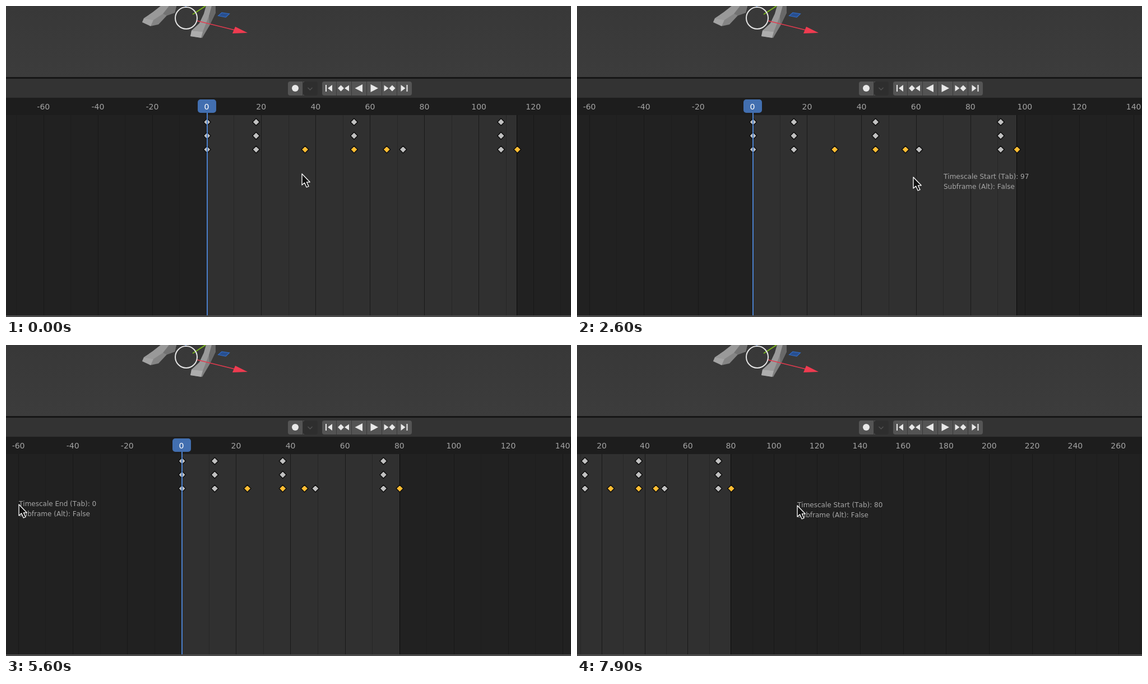
Recreate the animation shown at these times as an HTML page. Size 1008x556 px, loop 8000 ms.

```html
<!DOCTYPE html>
<html lang="en">
<head>
<meta charset="utf-8">
<title>Timeline</title>
<style>
html, body { margin: 0; width: 100%; height: 100%; overflow: hidden; background: #212121; }
svg { display: block; width: 1008px; height: 556px; }
text { font: 14px "DejaVu Sans", sans-serif; font-kerning: none; white-space: pre; }
.crisp rect { shape-rendering: crispEdges; }
.label { fill: #a3a3a3; text-anchor: middle; }
.hint text { font-size: 12px; fill: #a6a6a6; }
.pie text { fill: #dedede; }
.pie .num { fill: #737373; text-anchor: end; }
.pie .title { fill: #929292; text-anchor: middle; }
.line { fill: none; stroke: #d6d6d6; stroke-width: 1.5; }
.solid { fill: #dcdcdc; }
</style>
</head>
<body>
<svg viewBox="0 0 1008 556">
  <defs>
    <linearGradient id="room" x1="0" y1="0" x2="0" y2="1">
      <stop offset="0" stop-color="#383838"/><stop offset="1" stop-color="#3c3c3c"/>
    </linearGradient>
    <path id="key" d="M0-6.4L6.4 0L0 6.4L-6.4 0Z" stroke="#0c0c0c" stroke-width="1.4"/>
    <path id="arrow" d="M0 0V20L4.6 16L8.200 24L12 22.400L8.400 14.800H14.200Z" fill="#111" stroke="#fff" stroke-width="1.300" stroke-linejoin="round"/>
    <path id="hand" d="M0-7L3-3.5H-3ZM0 7L3 3.5H-3ZM-7 0L-3.5-3V3ZM7 0L3.5-3V3Z" fill="#111" stroke="#eee" stroke-width="1.2"/>
    <path id="bracket" class="line" d="M-9 4V-1.5H9V4"/>
    <path id="diamond" class="solid" d="M0-8L8 0L0 8L-8 0Z"/>
    <path id="squiggle" class="line" d="M-9 9C-5 8-8 4-7 1S-3 3-3-1S-1-6 1-4S3-3 4-6S7-5 9-7"/>
    <g id="clock"><circle class="solid" r="9.5"/><path d="M3-6L-2 0L3 5" fill="none" stroke="#181818" stroke-width="2.4"/></g>
    <path id="watch" class="line" d="M-7 2a7 7 0 1 0 14 0a7 7 0 1 0-14 0M0-5V-9M-3-9H3M0 2V-2M0 2H3M6-5L8-7"/>
    <g id="trim"><path class="line" d="M-5-8H9V-4H-5ZM-9-1H-1V2H-9ZM1-10V10"/><path class="solid" d="M-6 4H-1V9H-6ZM3 4H9V9H3Z"/></g>
    <g id="steps">
      <path d="M570 141H572V153H570ZM582 141V153L574 147Z"/>
      <path d="M592 147L597.5 141.5L603 147L597.5 152.5ZM612 141.5V152.5L604 147Z"/>
      <path d="M636 140V154L622.5 147Z"/>
    </g>
  </defs>

  <g id="sheet"></g>

  <rect width="1008" height="128" fill="url(#room)"/>
  <path d="M276 0L262 11L246 22L243 29L258 36L272 33L287 17L301 12L304 0Z" fill="#858585"/>
  <path d="M276 0L262 11L246 22L263 25L280 14L291 0Z" fill="#999"/>
  <path d="M243 29L246 22L263 25L258 36Z" fill="#a3a3a3"/>
  <path d="M291 0H304L301 12L287 17L280 14Z" fill="#737373"/>
  <path d="M357 0H374V12L363 35L350 57L329 54L331 44L345 31L353 14Z" fill="#808080"/>
  <path d="M357 0H367L362 18L351 46L331 44L345 31L353 14Z" fill="#9a9a9a"/>
  <path d="M331 44L351 46L348 57L329 54Z" fill="#adadad"/>
  <path d="M367 0H374V12L363 35L362 18Z" fill="#696969"/>
  <path d="M333 15L356 0" stroke="#79b51c" stroke-width="2"/>
  <path d="M320 2L321 0" stroke="#3b70c8" stroke-width="2"/>
  <path d="M341 26.5L408 43" stroke="#e23a4e" stroke-width="1.6"/>
  <path d="M404 49L409 37L431 48Z" fill="#ef3b50"/>
  <path d="M378.5 17.5L385 12L398.5 14L392 20Z" fill="#284f8f" stroke="#316bc4" stroke-width="1.2"/>
  <circle cx="321.5" cy="21.5" r="19.5" fill="none" stroke="#e6e6e6" stroke-width="2"/>

  <rect y="127" width="1008" height="3" fill="#161616"/>
  <rect y="130" width="1008" height="34" fill="#333"/>
  <rect x="503" y="135" width="40" height="25" rx="4" fill="#545454"/>
  <rect x="530" y="135" width="26" height="25" rx="4" fill="#2e2e2e"/>
  <path d="M529.5 135V160" stroke="#333"/>
  <path d="M538.5 146L542.5 150L546.5 146" fill="none" stroke="#555" stroke-width="1.3"/>
  <rect x="564" y="135" width="160" height="25" rx="4" fill="#545454"/>
  <path d="M589.5 135v25m27-25v25m27-25v25m27-25v25m27-25v25" stroke="#3a3a3a"/>
  <g fill="#e8e8e8">
    <circle cx="516" cy="147" r="6"/>
    <use href="#steps"/>
    <use href="#steps" transform="matrix(-1 0 0 1 1286.5 0)"/>
  </g>
  <rect y="553" width="1008" height="3" fill="#4b4b4b"/>

  <g id="ruler"></g>
  <g id="over"></g>
</svg>
<script>
const LOOP = 8000, STEP = 100, WIDTH = 1008;
const TOP = 195, BOTTOM = 553, ROW = 24.6;
const KEYS = [0, 18, 36, 54, 66, 72, 108, 114];
const ORANGE = [36, 54, 66, 114];
const UPPER = [0, 18, 54, 108];

// Key points: time, then values, linear in between.
const mouse = [
  [0, 528, 300], [500, 558, 309], [1300, 558, 309], [1400, 535.5, 302], [1600, 340, 308],
  [2200, 720, 306], [2500, 654, 306], [2600, 600, 306], [2900, 600, 311], [3500, 452, 275],
  [3800, 452, 275], [4100, 390, 276], [4600, 690, 284], [5500, 23, 285], [5800, 23, 285],
  [6100, 597, 312], [6600, 597, 312], [7100, 487, 311], [7400, 225, 306], [7600, 430, 290],
  [7800, 393, 287]
];
const lastFrame = [
  [1700, 114], [2200, 148], [2500, 144], [2600, 97], [2800, 58], [4200, 58], [4600, 100], [5200, 80]
];
// Time, position of frame zero, pixels per frame, vertical scroll.
const view = [
  [200, 358.4, 4.855, 0], [500, 313.7, 4.855, 0], [6200, 313.7, 4.855, 0],
  [6500, 354, 3.84, 0], [7100, 229.6, 3.84, -8.7], [7400, -32.4, 3.84, 0]
];
// Opening, closing, centre.
const pies = [[700, 1700, 558, 309], [3700, 4200, 452, 275], [7600, 7800, 430, 290]];
const pans = [[200, 500], [6600, 7500]];
const modals = [[1700, 3000], [4200, 5900], [7900, 8000]];

// The number is the numpad key, which also gives the direction.
const items = [
  { name: "Auto Frame Range", num: 8, icon: "bracket" },
  { name: "Bake Keyframe (Experimental)", num: 7, icon: "diamond", hot: "B" },
  { name: "Randomize Keyframes", num: 9, icon: "squiggle", hot: "R" },
  { name: "Timescale Keyframe (Slow)", num: 4, icon: "clock", hot: "T" },
  { name: "Set Frame Range", num: 6, icon: "watch", hot: "S" },
  { name: "Trim Keyframe", num: 2, icon: "trim", hot: "K" }
];

const pen = document.createElement("canvas").getContext("2d");
pen.font = '14px "DejaVu Sans", sans-serif';
pen.fontKerning = "none";
const widthOf = s => pen.measureText(s).width;

function at(track, t) {
  if (t <= track[0][0]) return track[0].slice(1);
  const i = track.findIndex(p => p[0] > t);
  if (i < 0) return track[track.length - 1].slice(1);
  const a = track[i - 1], b = track[i], k = (t - a[0]) / (b[0] - a[0]);
  return a.slice(1).map((v, n) => v + (b[n + 1] - v) * k);
}
const within = (spans, t) => spans.find(s => t >= s[0] && t < s[1]);
const rect = (x, y, w, h, fill, more = "") =>
  `<rect x="${x}" y="${y}" width="${Math.max(0, w)}" height="${h}" fill="${fill}" ${more}/>`;
const text = (x, y, s, cls = "") => `<text x="${x}" y="${y}" class="${cls}">${s}</text>`;
const use = (id, x, y, fill = "") => `<use href="#${id}" x="${x}" y="${y}" fill="${fill}"/>`;

// The second drag scales the keys that the first one left on whole frames.
function moveKey(frame, t, end) {
  if (t < 3000) return Math.floor(frame * end / 114);
  return Math.floor(Math.floor(frame * 58 / 114) * end / 58);
}

function drawSheet(t, zero, unit, scroll, end) {
  const h = BOTTOM - TOP, left = Math.floor(zero), stop = Math.floor(zero + end * unit);
  let out = rect(0, 164, WIDTH, 392, "#212121") + rect(left, TOP, stop - left, h, "#303030");
  const first = Math.ceil(-zero / unit / 10) * 10;
  for (let f = first; zero + f * unit < WIDTH; f += 10) {
    const inside = f >= 0 && f < end, major = f % 20 === 0;
    const alpha = inside ? (major ? 0.48 : 0.18) : (major ? 0.26 : 0.13);
    out += rect(Math.floor(zero + f * unit), TOP, 1, h, "#000", `opacity="${alpha}"`);
  }
  out += rect(stop, TOP, 1, h, "#0b0b0b");
  for (let row = 0; row < 3; row++) {
    for (const k of row < 2 ? UPPER : KEYS) {
      const colour = row === 2 && ORANGE.includes(k) ? "#ffbd33" : "#c1c1c1";
      const x = zero + moveKey(k, t, end) * unit + 0.4;
      out += use("key", x, 207.4 + row * ROW + scroll, colour);
    }
  }
  return `<g class="crisp">${out}</g>`;
}

function drawRuler(zero, unit) {
  let out = rect(0, 164, WIDTH, 31, "#1d1d1d");
  const first = Math.floor(-zero / unit / 20) * 20;
  for (let f = first; zero + f * unit < WIDTH + 20; f += 20)
    if (f) out += text(zero + f * unit - 0.3, 185, f, "label");
  const x = Math.floor(zero);
  out += rect(x, 190, 2, BOTTOM - 190, "#4a7fca", 'shape-rendering="crispEdges"');
  out += rect(x - 16, 167, 33, 24, "#426fb0", 'rx="5"');
  return out + `<text x="${x}" y="184.5" text-anchor="middle" fill="#fff">0</text>`;
}

function drawPie([from, , cx, cy], t, mx) {
  const grow = t < from + STEP ? 0.683 : 1;
  const hover = cx - mx > 40;
  let out = "";
  for (const { name, num, icon, hot } of items) {
    const col = (num - 1) % 3 - 1, row = 1 - Math.floor((num - 1) / 3);
    const w = Math.round(widthOf(name)) + 86;
    const dx = col * ((row ? 96 : 136) + w / 2), dy = row * (col ? 96 : 155);
    const x = cx + dx * grow - w / 2, y = cy + dy * grow;
    const fill = hover && num === 4 ? "#4772b3" : "#181818";
    out += rect(x, y - 19.5, w, 39, fill, 'rx="4" fill-opacity=".97"');
    out += use(icon, x + 22.5, y) + text(x + 42, y + 5, name) + text(x + w - 7.5, y + 5, num, "num");
    if (hot) {
      const before = widthOf(name.slice(0, name.indexOf(hot)));
      out += rect(x + 42 + before, y + 8.5, widthOf(hot) - 1, 1, "#dedede");
    }
  }
  return `<g class="pie"><g opacity="${grow < 1 ? 0.68 : 1}">${out}</g>` +
    `<circle cx="${cx + 0.3}" cy="${cy + 0.5}" r="21.5" fill="none" stroke="#1a1a1a" stroke-width="9"/>` +
    text(cx + 0.5, cy - 36, "Frame Modal Operator", "title") + "</g>";
}

// The hint trails the pointer by one step.
function drawHint(t, end) {
  const [x, y] = at(mouse, t - STEP);
  const fromEnd = t >= 5200 && t < 5900;
  const head = fromEnd ? "Timescale End (Tab): 0" : `Timescale Start (Tab): ${end}`;
  return `<g class="hint">${text(x, y + 2.5, head)}${text(x, y + 21, "Subframe (Alt): False")}</g>`;
}

const layer = id => document.getElementById(id);
const sheet = layer("sheet"), ruler = layer("ruler"), over = layer("over");

function draw(t) {
  const [zero, unit, scroll] = at(view, t);
  const [mx, my] = at(mouse, t);
  const end = Math.round(at(lastFrame, t)[0]);
  const pie = within(pies, t);
  sheet.innerHTML = drawSheet(t, zero, unit, scroll, end);
  ruler.innerHTML = drawRuler(zero, unit);
  over.innerHTML = (pie ? drawPie(pie, t, mx) : "") +
    (within(modals, t) ? drawHint(t, end) : "") +
    use(within(pans, t) ? "hand" : "arrow", mx, my);
}

let start, shown = -1;
function tick(now) {
  start ??= now;
  const t = Math.floor((now - start) % LOOP / STEP) * STEP;
  if (t !== shown) draw(shown = t);
  requestAnimationFrame(tick);
}
draw(0);
requestAnimationFrame(tick);
</script>
</body>
</html>
```
